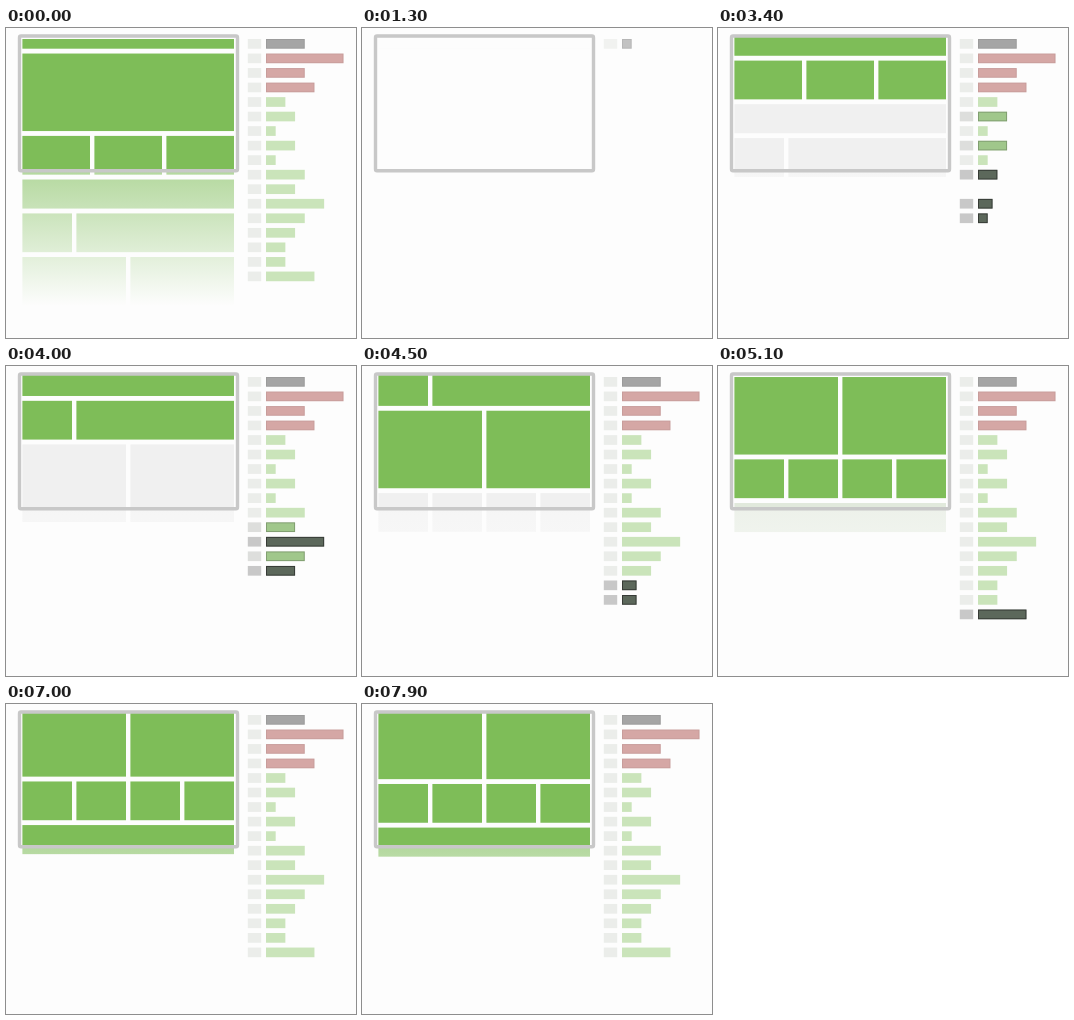
An HTML page with a canvas that plays this animation: 350 px wide and 310 px high, repeating every 8 s.

```html
<!DOCTYPE html>
<html lang="en">
<head>
<meta charset="utf-8">
<title>Lazy loading</title>
<style>
  html, body { margin: 0; width: 100%; height: 100%; overflow: hidden; background: #fdfdfd; }
  canvas { display: block; width: 350px; height: 310px; }
</style>
</head>
<body>
<canvas id="stage"></canvas>
<script>
const LOOP = 8000, STEP = 100, RESET = 1200;
const UNIT = 9.69, ROW_GAP = UNIT / 2, COLUMN = 18, COLUMN_GAP = 4.4;
const LEFT = 16.4, TOP = 11, FOLD = 142, BAR_X = 260;
const BACK = "#fdfdfd", EMPTY = "#f0f0f0", GREEN = "#7ebd58";
const DARK = "#5c685b", MID = "#a0c78b", LIGHT = "#cae4ba";
const LABEL_ON = "#c8c8c8", LABEL_OFF = "#ebedea";

// Each section fires its requests (one digit = length in units) from `at`,
// `lag` apart. Its tiles split 12 columns evenly unless `first` sets the first.
const sections = [
  { at: 1200, units: "4", tint: "#a5a5a5" },
  { at: 1600, units: "845", tint: "#d5a7a5" },
  { at: 2500, units: "2", tiles: 1, height: 1 },
  { at: 2800, units: "3", tiles: 1, height: 8 },
  { at: 2800, units: "131", tiles: 3, height: 4 },
  { at: 3200, units: "4", tiles: 1, height: 3 },
  { at: 3400, units: "36", lag: -150, tiles: 2, first: 3, height: 4 },
  { at: 3300, units: "43", lag: 400, tiles: 2, height: 8 },
  { at: 4350, units: "22", tiles: 4, height: 4 },
  { at: 4580, units: "5", tiles: 1, height: 3 }
];

const glides = [
  { at: 3100, lasts: 600, by: 150.6 },
  { at: 4250, lasts: 500, by: 67.4 },
  { at: 5450, lasts: 550, by: 17 },
  { at: 6600, lasts: 1100, by: -3.6 }
];

const requests = [];
let nextTop = TOP;
for (const section of sections) {
  const { at, units, lag = 0, tint } = section;
  const batch = [...units].map((n, i) => {
    const start = at + i * lag;
    return { start, end: start + n * 100, units: +n, tint };
  });
  requests.push(...batch);
  section.ready = Math.max(...batch.map(r => r.end));
  if (section.tiles) {
    section.top = nextTop;
    nextTop += section.height * UNIT + ROW_GAP;
  }
}
const rows = sections.filter(s => s.tiles);

const canvas = document.getElementById("stage");
const ctx = canvas.getContext("2d");
const ratio = window.devicePixelRatio || 1;
canvas.width = 350 * ratio;
canvas.height = 310 * ratio;

const clamp = x => Math.max(0, Math.min(1, x));
const ramp = (t, start, lasts) => clamp((t - start) / lasts);
const ease = x => x * x * (3 - 2 * x);
const channels = hex => hex.match(/\w\w/g).map(c => parseInt(c, 16));

function mix(from, to, p) {
  const b = channels(to);
  return "#" + channels(from)
    .map((v, i) => Math.round(v + (b[i] - v) * p).toString(16).padStart(2, "0")).join("");
}

function box(x, y, w, h, color) {
  ctx.fillStyle = color;
  ctx.fillRect(x, y, w, h);
}

const scrollAt = t => glides.reduce((y, g) => y + g.by * ease(ramp(t, g.at, g.lasts)), 0);

function drawPage(t, loaded) {
  const scroll = loaded ? 0 : scrollAt(t);
  const blank = mix(BACK, EMPTY, ramp(t, 2300, 200));
  ctx.save();
  ctx.beginPath();
  ctx.rect(14, 9, 216, 290);
  ctx.clip();
  for (const { top, height, tiles, first, ready } of rows) {
    const y = top - scroll;
    if (!loaded && y > FOLD) continue;
    const color = mix(blank, GREEN, loaded ? 1 : ramp(t, ready, 150));
    let column = 0;
    for (let i = 0; i < tiles; i++) {
      const span = first ? (i ? 12 - first : first) : 12 / tiles;
      box(LEFT + column * COLUMN, y, span * COLUMN - COLUMN_GAP, height * UNIT, color);
      column += span;
    }
  }
  const fade = ctx.createLinearGradient(0, FOLD, 0, 278);
  fade.addColorStop(0, "rgba(253,253,253,.42)");
  fade.addColorStop(1, "rgba(253,253,253,1)");
  box(0, FOLD, 350, 168, fade);
  ctx.restore();
}

function drawRequest({ units, start, end, tint }, index, t, loaded) {
  if (!loaded && t <= start) return;
  const y = TOP + index * UNIT * 1.5;
  const width = UNIT * units * (loaded ? 1 : ramp(t, start, end - start));
  const shown = loaded ? 1 : ramp(t, start, 150);
  const settled = loaded ? 1 : ramp(t, end + 150, 250);
  const green = settled < .6 ? mix(DARK, MID, settled / .6) : mix(MID, LIGHT, settled / .4 - 1.5);
  const label = tint ? mix(BACK, LABEL_OFF, shown) : mix(LABEL_ON, LABEL_OFF, settled);
  box(241.8, y, 13.4, UNIT, label);
  box(BAR_X, y, width, UNIT, tint ? mix(BACK, tint, shown) : green);
  ctx.strokeStyle = `rgba(30,30,30,${tint ? .07 : .6 * (1 - settled)})`;
  ctx.lineWidth = 1;
  ctx.strokeRect(BAR_X + .5, y + .5, Math.max(0, width - 1), UNIT - 1);
}

function draw(t) {
  const loaded = t < RESET;
  ctx.setTransform(ratio, 0, 0, ratio, 0, 0);
  box(0, 0, 350, 310, BACK);
  ctx.globalAlpha = loaded ? 1 - ramp(t, RESET - 200, 200) * (t >= 1100) : 1;
  drawPage(t, loaded);
  requests.forEach((request, i) => drawRequest(request, i, t, loaded));
  ctx.globalAlpha = 1;
  ctx.strokeStyle = "#c8c8c8";
  ctx.lineWidth = 3.4;
  ctx.beginPath();
  ctx.roundRect(13.5, 8, 218, 134.7, 1.5);
  ctx.stroke();
}

const origin = performance.now();
function tick() {
  const t = (performance.now() - origin) % LOOP;
  draw(Math.floor(t / STEP) * STEP);
  requestAnimationFrame(tick);
}
tick();
</script>
</body>
</html>
```
